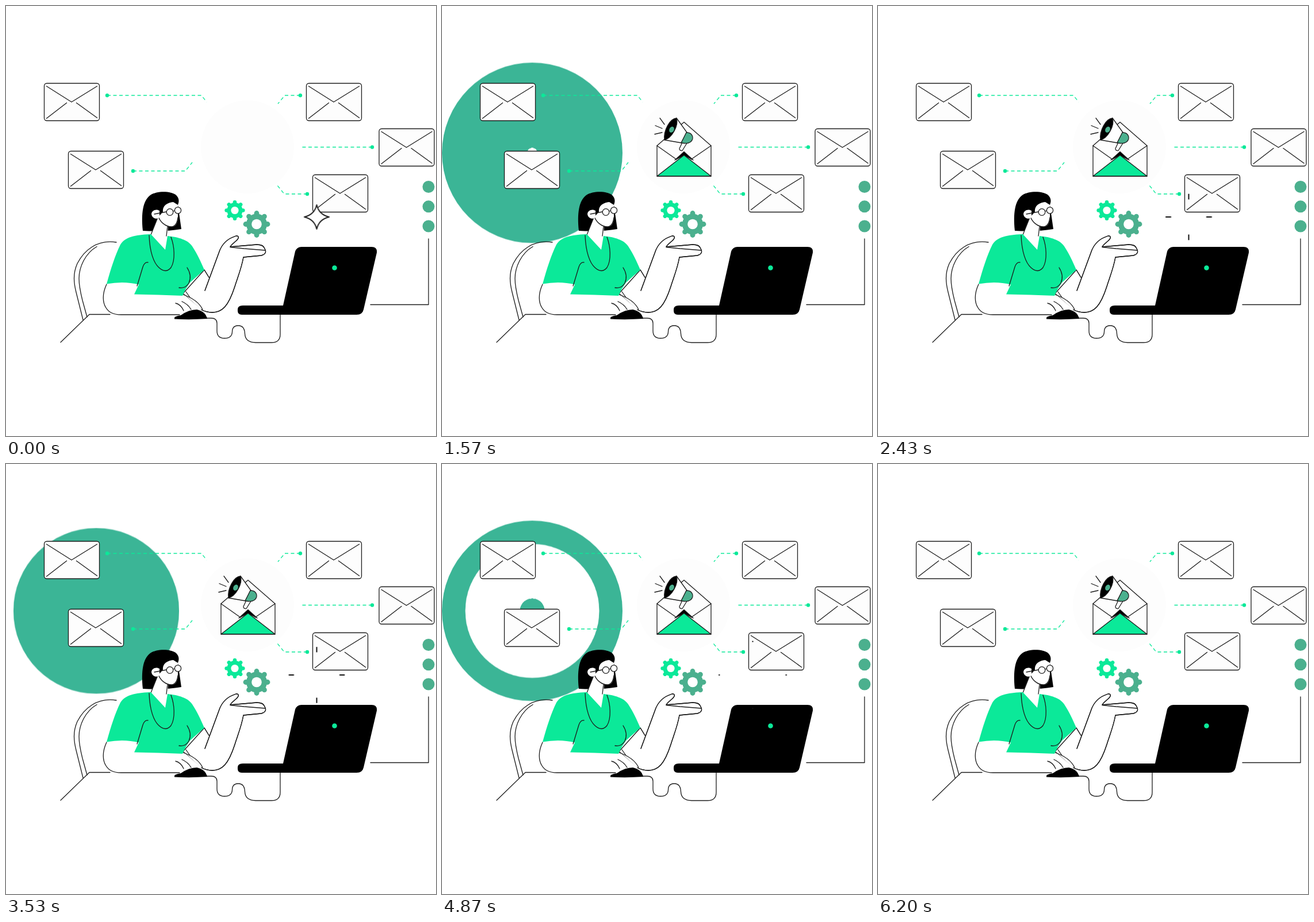
Recreate the animation shown at these times as an HTML page without scripts. Size 748x748 px, loop 6230 ms.

```html
<!DOCTYPE html>
<html lang="en">
<head>
<meta charset="utf-8">
<title>Email campaign</title>
<style>
  :root { --bright: #0be999; --mid: #4bb08e; --ink: #1c1c1c; }
  html, body { margin: 0; width: 100%; height: 100%; overflow: hidden; background: #fff; }
  svg { display: block; width: 100%; height: 100%; }
  .line { fill: none; stroke: var(--ink); stroke-width: 1.3; stroke-linecap: round; stroke-linejoin: round; }
  .paper { fill: #fdfdfd; }
  .white { fill: #fff; }
  .green { fill: var(--bright); }
  .mid { fill: var(--mid); }
  .dash { fill: none; stroke: var(--bright); stroke-width: 1.3; stroke-dasharray: 6 4.5; }

  /* ripple: two discs, each wiped out by a white one; two cycles per loop */
  .pulse { animation: show 3115ms step-end infinite; }
  .pulse circle { animation: 3115ms infinite; }
  .d1 { animation-name: d1 !important; }
  .h1 { animation-name: h1 !important; }
  .d2 { animation-name: d2 !important; }
  .h2 { animation-name: h2 !important; }
  .disc { fill: #3bb596; }
  @keyframes show { 0% { opacity: 1 } 73.4%, 100% { opacity: 0 } }
  @keyframes d1 {
    0% { transform: scale(0) }
    2.47% { transform: scale(0); animation-timing-function: cubic-bezier(.19,.72,.4,1) }
    22.2%, 100% { transform: scale(1) }
  }
  @keyframes h1 {
    0% { transform: scale(0) }
    50.14% { transform: scale(0); animation-timing-function: cubic-bezier(.19,.72,.4,1) }
    69.9%, 100% { transform: scale(1) }
  }
  @keyframes d2 {
    0% { transform: scale(0) }
    55.6% { transform: scale(0); animation-timing-function: cubic-bezier(.19,.72,.4,1) }
    75.34%, 100% { transform: scale(1) }
  }
  @keyframes h2 {
    0% { transform: scale(0) }
    59.39% { transform: scale(0); animation-timing-function: cubic-bezier(.19,.72,.4,1) }
    79.13%, 100% { transform: scale(1) }
  }

  /* the open letter is missing for the first instant */
  .letter { animation: appear 6230ms step-end infinite; }
  @keyframes appear { 0% { opacity: 0 } .47%, 100% { opacity: 1 } }

  /* sparkle every 1940 ms, cut at the loop's end */
  .star { animation: star 6230ms infinite linear; }
  @keyframes star {
    0%, 1.77%, 30.82%, 32.91%, 61.96%, 64.04%, 93.1%, 95.18% { transform: scale(1) }
    3.69%, 34.83%, 65.97%, 97.11%, 100% { transform: scale(0) }
    27.61%, 58.75%, 89.8% { transform: scale(0); animation-timing-function: ease-out }
  }
  .ray { stroke: #111; stroke-width: 2; animation: ray 6230ms infinite linear; }
  @keyframes ray {
    0%, 2.89%, 34.03%, 65.17%, 96.31% { stroke-dasharray: 0 100; stroke-dashoffset: 0 }
    4.49%, 35.63%, 66.77%, 97.91% { stroke-dasharray: 12 100; stroke-dashoffset: -8 }
    6.1%, 37.24%, 68.38%, 99.52% { stroke-dasharray: 3 100; stroke-dashoffset: -32 }
    7.87%, 39%, 70.14% { stroke-dasharray: 0 100; stroke-dashoffset: -36 }
    100% { stroke-dasharray: 2 100; stroke-dashoffset: -33 }
  }
</style>
</head>
<body>
<svg viewBox="0 0 748 748">
  <defs>
    <g id="mail" class="line">
      <rect class="paper" width="96" height="65" rx="4.5"/>
      <path d="M4 5L47.500 32.500 92 5M4 61L39 34M56 34L92 60"/>
    </g>
    <path id="bar" d="M0-14.300V14.300" stroke-width="6.600" stroke-linecap="round"/>
    <g id="gear">
      <circle r="13.600" stroke="none"/>
      <use href="#bar"/>
      <use href="#bar" transform="rotate(45)"/>
      <use href="#bar" transform="rotate(90)"/>
      <use href="#bar" transform="rotate(135)"/>
      <circle class="white" r="6.600" stroke="none"/>
    </g>
    <path id="ray" class="ray" d="M24 0H60"/>
  </defs>

  <g class="pulse" transform="translate(157 255.500)">
    <circle class="disc d1" r="157"/>
    <circle class="white h1" r="158.500"/>
    <circle class="disc d2" r="153"/>
    <circle class="white h2" r="158.500"/>
  </g>

  <circle class="paper" cx="420" cy="245" r="81"/>

  <path class="dash" d="M176 155.500H340L349 167M221 287H312L324 272M512 155.500H485L473 170M637 245.500H511M524 327H484L472 312"/>
  <g class="green">
    <circle cx="176" cy="155.500" r="3.200"/>
    <circle cx="221" cy="287" r="3.200"/>
    <circle cx="512" cy="155.500" r="3.200"/>
    <circle cx="637" cy="245.500" r="3.200"/>
    <circle cx="524" cy="327" r="3.200"/>
  </g>

  <use href="#mail" x="66.500" y="134.500"/>
  <use href="#mail" x="108.500" y="252.500"/>
  <use href="#mail" x="522.500" y="134.500"/>
  <use href="#mail" x="649" y="213.500"/>
  <use href="#mail" x="533.500" y="293.500"/>

  <g class="letter line">
    <path class="paper" d="M374 296V243L421 202 468 243V296Z"/>
    <path d="M374 243L408 267M468 243L433 267"/>
    <path d="M405 268L421 253.500 437 268 421 260Z" fill="#000"/>
    <path class="green" d="M374 296L421 259.500 468 296Z"/>
    <path class="white" d="M419 235L413 248Q413 252 418 251.500L427 237Z"/>
    <path class="white" d="M408 195L426 220 416 238 387 233Z"/>
    <path class="mid" d="M425 220C436 220 439 230 433 236C428 240 422 239 416 238Z"/>
    <path d="M408 195C396 196 385 217 387 233C400 230 412 208 408 195Z" fill="#000"/>
    <ellipse class="mid" cx="399.500" cy="215" rx="4" ry="5.500" transform="rotate(28 399.500 215)" stroke="none"/>
    <path d="M379 195L387 206M371 208L383 213M370 223L383 220"/>
  </g>

  <use href="#gear" transform="translate(398 355.500)" fill="#0be999" stroke="#0be999"/>
  <use href="#gear" transform="translate(436 379.500) scale(1.330)" fill="#4bb08e" stroke="#4bb08e"/>

  <g class="mid">
    <circle cx="735" cy="314.500" r="10.500"/>
    <circle cx="735" cy="348.800" r="10.500"/>
    <circle cx="735" cy="383" r="10.500"/>
  </g>

  <!-- chair, desk and cables -->
  <path class="line" d="M735 405V519.500H634M477 537V571Q477 585.500 462 585.500H434Q416 585 415.500 570Q415 556 404 556Q393.500 556 393.500 567Q393 578 380 578Q367 578 367 565V552Q367 543 357 543H349"/>
  <path class="line" d="M192 411C158 406 136 425 124 448C116 466 118 482 122 498L134 546M158 418.500C138 430 127 454 127 474C127 488 130 500 133 512L141 541M95 585L145 536.500H181"/>

  <path d="M482 521L503 427Q506 419 514 419H636Q646 419 645 429L622 528Q620 537 610 537H410Q403 537 403 530V528Q403 521 412 521Z"/>
  <circle class="green" cx="571.500" cy="455.500" r="4.300"/>

  <!-- arms -->
  <path class="line white" d="M346 495L370 430C376 411 388 404 400 400Q405 399 404 404C402 409 393 413 390 419L436 415Q448 415 450 422Q455 431 444 434L413 437C410 455 403 472 398 488C387 522 376 533 359 533Q346 533 336 526L308 500 345 459 353 472" stroke="none"/>
  <path class="line" d="M346 495L370 430C376 411 388 404 400 400Q405 399 404 404C402 409 393 413 390 419L436 415Q448 415 450 422Q455 431 444 434L413 437C410 455 403 472 398 488C387 522 376 533 359 533Q350 533 341 529M390 419.500L414 422 451 425M345 459L353 472"/>
  <path class="white" d="M175 484C167 501 168 516 174 525Q181 537 200 537H302L340 528 310 502 231 484Z"/>
  <path class="line" d="M175 484C167 501 168 516 174 525Q181 537 200 537H302M295 517Q304 519 309 530M306 514Q317 519 322 528M308 502Q334 511 342 528M313 497L320 507"/>
  <path d="M293 543Q292 540 304 538Q318 528 332 528Q347 531 350 544Q322 546 293 544.500Z"/>

  <!-- head -->
  <path d="M238 391C235 360 238 339 251 329C264 321 287 322 296 329C302 335 301 341 299 346L305 388Q276 393 238 391Z"/>
  <path class="white" d="M264 368L252 398 276 424 281 400 282 383Z"/>
  <path class="white" d="M273 358C272 347 281 342 291 341L299 346 299 366C299 378 295 384 288 384C277 384 268 377 264 368Z"/>
  <path class="line" d="M264 368L252 398M264 363C267 376 278 384 288 384Q297 383 299 368M281 383L279 400"/>
  <path class="white" d="M267 356C261 352 253 356 253 362C254 369 261 372 267 368Z"/>
  <g class="line">
    <path d="M258 362L279 358M291 357L293 356"/>
    <circle class="white" cx="285" cy="358.500" r="5.800"/>
    <circle class="white" cx="299" cy="355.500" r="5.600"/>
  </g>

  <!-- shirt -->
  <path class="green" d="M250 397C225 398 207 402 199 415C190 433 182 458 175 483.500Q205 478 231 484.500L223 501.500Q265 502 307 504Q312 492 320 481L345 459C339 445 332 430 324 418C317 407 300 402 281 400L277 424 252 397Z"/>
  <path class="line" d="M249 399C250 428 257 447 266 455Q278 466 287 455C295 442 293 418 287 402M247 446Q241 445 238 454L228 487M315 455Q324 469 318 482Q312 492 301 490"/>

  <g transform="translate(540.500 367)">
    <path class="star" d="M0-21Q4-4 21.500 0Q4 4 0 21Q-4 4-21.500 0Q-4-4 0-21Z" fill="#fff" stroke="#222" stroke-width="2" stroke-linejoin="round"/>
    <use href="#ray"/>
    <use href="#ray" transform="rotate(90)"/>
    <use href="#ray" transform="rotate(180)"/>
    <use href="#ray" transform="rotate(270)"/>
  </g>
</svg>
</body>
</html>
```
